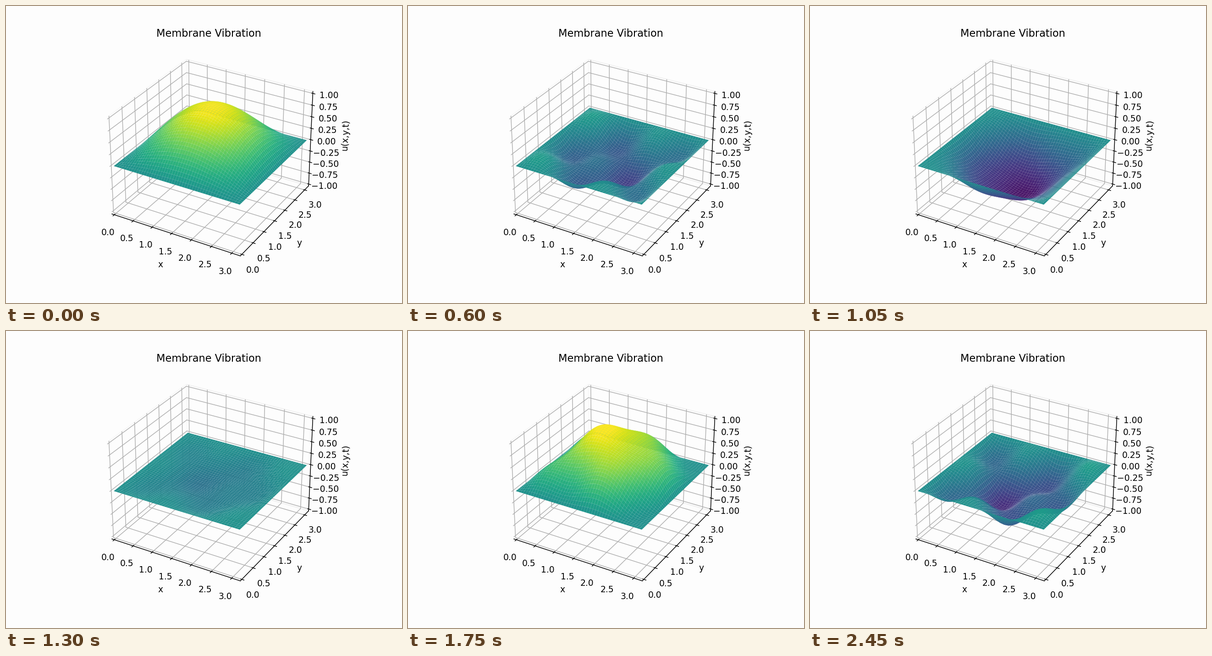
Animation of 864 by 648 pixels, one loop 2500 ms. Source, as a matplotlib script:

```python
import numpy as np
import matplotlib.pyplot as plt
from matplotlib.animation import FuncAnimation

FRAMES = 50
INTERVAL = 50
PAPER = "#fdfdfd"
MARGIN = 1 / 48  # room between the data limits and the panes

side = np.linspace(0, np.pi, 50)
X, Y = np.meshgrid(side, side)
times = np.linspace(0, 6, FRAMES)


def height(t):
    """Two standing waves of a square membrane with fixed edges."""
    base = np.sin(X) * np.sin(Y) * np.cos(np.sqrt(2) * t)
    ripple = np.sin(4 * X) * np.sin(3 * Y) * np.sin(5 * t) / 5
    return base + ripple


fig = plt.figure(figsize=(6.4, 4.8), dpi=135, facecolor=PAPER)
ax = fig.add_subplot(projection="3d", facecolor=PAPER)
ax.set_title("Membrane Vibration")
ax.set_xlabel("x")
ax.set_ylabel("y")
ax.set_zlabel("u(x,y,t)")
ax.set_xlim(0, np.pi, view_margin=MARGIN)
ax.set_ylim(0, np.pi, view_margin=MARGIN)
ax.set_zlim(-1, 1, view_margin=MARGIN)
for axis in (ax.xaxis, ax.yaxis, ax.zaxis):
    axis.pane.set_facecolor(PAPER)


def draw(i):
    for old in list(ax.collections):
        old.remove()
    return [ax.plot_surface(X, Y, height(times[i]), cmap="viridis",
                            vmin=-1, vmax=1)]


anim = FuncAnimation(fig, draw, frames=FRAMES, interval=INTERVAL,
                     repeat=True, repeat_delay=0, blit=False)
plt.show()
```
